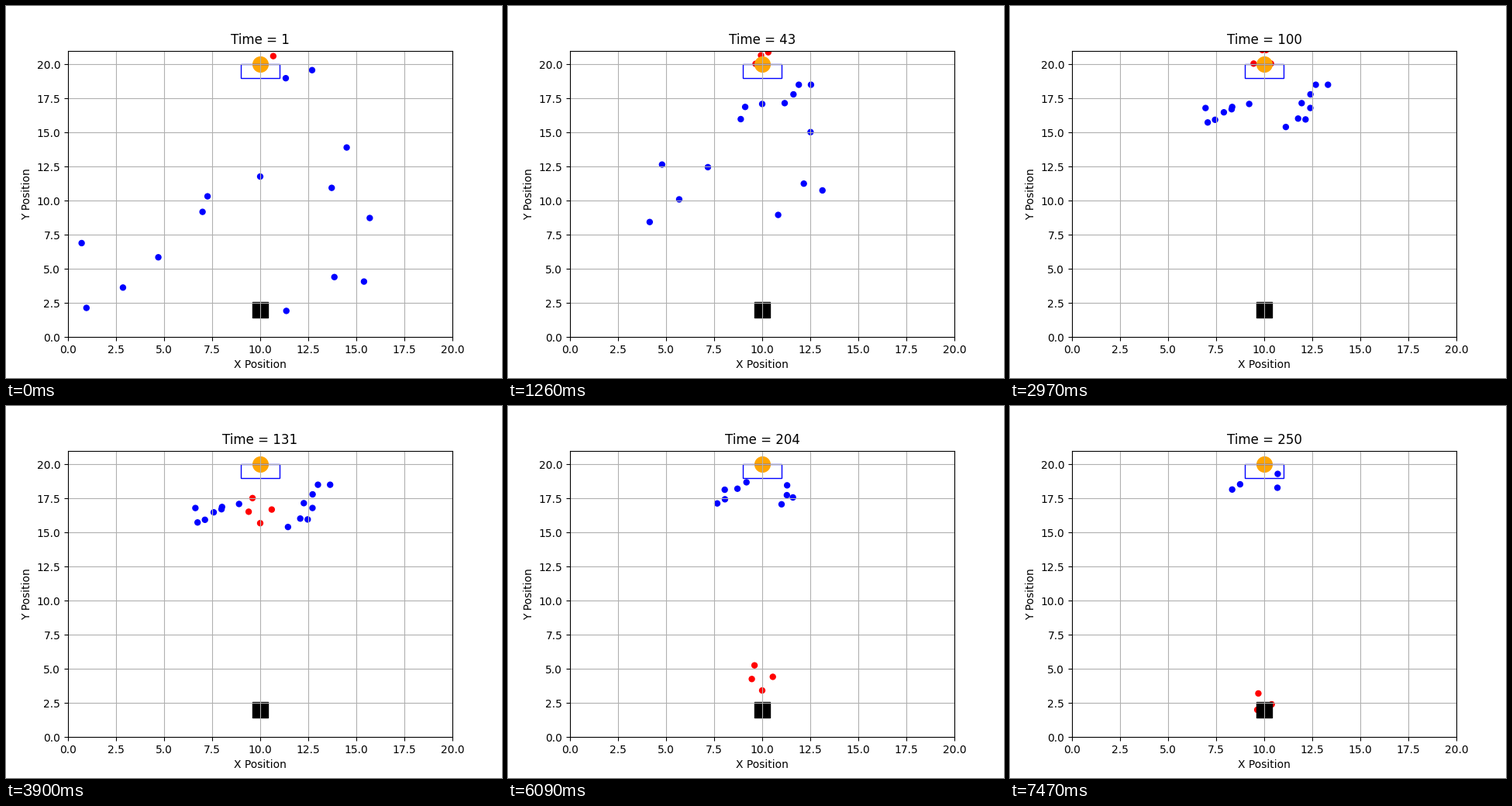
A matplotlib script that plays this animation: 640x480 px, repeating every 7500 ms.

```python
import numpy as np
import matplotlib.pyplot as plt
from matplotlib.animation import FuncAnimation
from matplotlib.patches import Rectangle

FRAMES = 250
STEP_MS = 30
PACE = 0.168                     # walking speed, units per frame
DOOR = np.array([10.0, 20.0])
EXIT = np.array([10.0, 2.0])
FRONT_Y = 18.7                   # head of the boarding queue
PART = (60, 115)                 # crowd clears the middle
DRIFT = 140                      # crowd starts to close in again

# where the waiting people first stand
CROWD = np.array([
    (0.71, 6.89), (0.96, 2.14), (2.86, 3.63), (4.7, 5.85), (7.0, 9.18),
    (7.26, 10.32), (10.0, 11.77), (11.33, 18.98), (11.36, 1.92),
    (12.7, 19.57), (13.72, 10.94), (13.86, 4.4), (14.5, 13.9),
    (15.4, 4.07), (15.7, 8.73)])
CROWD = CROWD[np.argsort(np.hypot(*(CROWD - DOOR).T))]   # nearest first

# people inside: first place, place before leaving, lane on the way out
INSIDE = [((10, 20), (10.35, 20.05), 0.0),
          ((10, 20), (9.45, 20.05), -0.6),
          ((10.68, 20.6), (10.1, 21.05), 0.6),
          ((10, 20), (9.9, 21.05), -0.4)]


def mix(a, b, u):
    return a + (b - a) * np.clip(u, 0, 1)


def waiting_spot(k, frame):
    """Later arrivals stop further from the door, on their own line to it."""
    away = CROWD[k] - DOOR
    side = 1 if away[0] > 0 else -1
    x, y = DOOR + away / np.hypot(*away) * (2.4 + 0.17 * k)
    return np.array([x + side * np.interp(frame, PART, (0, 1.1)),
                     min(y, 18.5)])


def boarder(k, frame):
    start, spot = CROWD[k], waiting_spot(k, frame)
    if frame < DRIFT:
        return mix(start, spot, PACE * frame / np.hypot(*(spot - start)))
    turn = 163 + 7.5 * max(k - 1, 0) ** 1.05
    front = np.array([mix(DOOR[0], spot[0], 0.4), FRONT_Y])
    if frame < turn:
        return mix(spot, front, (frame - DRIFT) / (turn - DRIFT))
    inside = np.array([10.4 - 0.8 * (k % 2), 21.6])
    return mix(front, inside, (frame - turn) / 9)


def leaver(k, frame):
    first, ready, lane = INSIDE[k]
    x, y = mix(np.array(first), np.array(ready), frame / 67)
    walked = frame - (104 + 5 * (k % 2))
    if walked > 0:
        # the last ones queue up above the exit
        y = max(y - PACE * walked, EXIT[1] + 0.2 * k * (k - 1))
        lane *= np.interp(y, (2, 5), (0.6, 1))
        x = mix(x, EXIT[0] + lane, walked / 20)
    return x, y


def positions(frame):
    return ([boarder(k, frame) for k in range(len(CROWD))]
            + [leaver(k, frame) for k in range(len(INSIDE))])


fig, ax = plt.subplots(figsize=(6.4, 4.8), dpi=100)
ax.set_xlim(0, 20)
ax.set_ylim(0, 21)
ax.set_xlabel("X Position")
ax.set_ylabel("Y Position")
ax.grid(True)
title = ax.set_title("Time = 1")

dots = ax.scatter(*np.transpose(positions(0)), s=25,
                  c=["blue"] * len(CROWD) + ["red"] * len(INSIDE))
ax.scatter(*DOOR, s=200, c="orange")
ax.scatter(*EXIT, s=200, c="black", marker="s")
ax.add_patch(Rectangle((9, 19), 2, 1, fill=False, edgecolor="blue", lw=1))


def draw(frame):
    dots.set_offsets(positions(frame))
    title.set_text(f"Time = {frame + 1}")
    return dots, title


anim = FuncAnimation(fig, draw, frames=FRAMES, interval=STEP_MS,
                     repeat=True, repeat_delay=0, blit=False)
plt.show()
```
